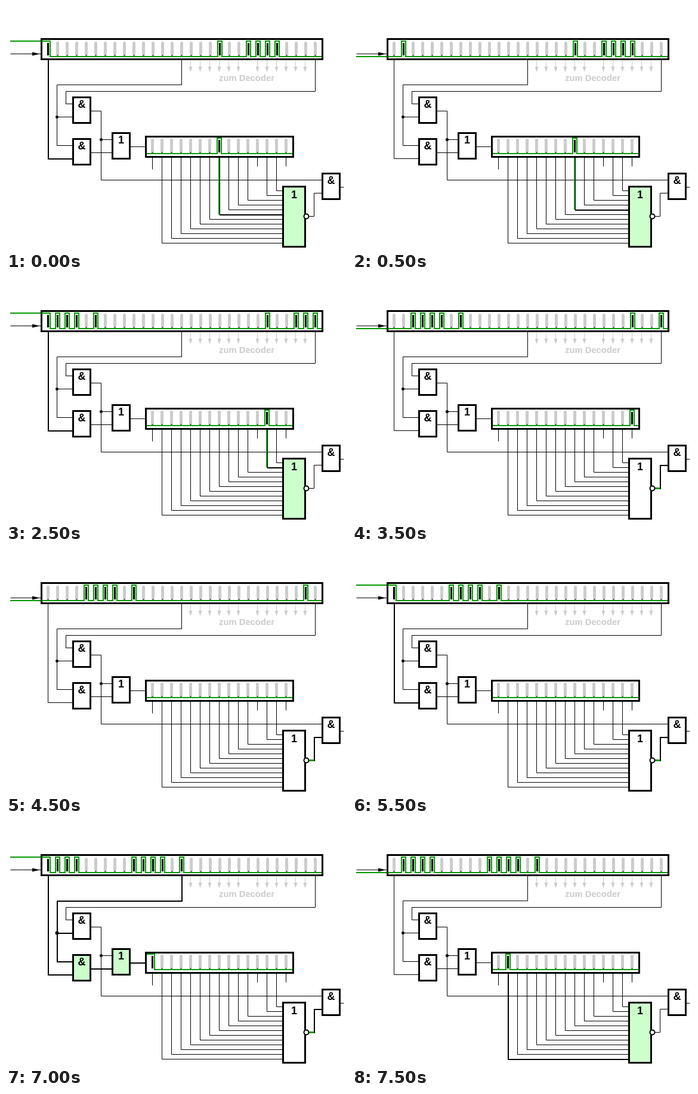
Write an HTML page with a canvas that moves like this. It is 570 px wide and 410 px high and loops after 8 s.

```html
<!DOCTYPE html>
<html lang="de">
<head>
<meta charset="utf-8">
<style>
html, body { margin: 0; width: 100%; height: 100%; overflow: hidden; background: #fff; }
canvas { display: block; }
</style>
</head>
<body>
<canvas id="stage" width="570" height="410"></canvas>
<script>
const ctx = document.getElementById('stage').getContext('2d');
const GREEN = '#009900', LIT = '#ccffcc', GRAY = '#cccccc';
const STEP = 500, STEPS = 16;

// Step at which each 1 enters the upper register
const entries = new Set([-24, -23, -22, -21, -18, 0, 2, 3, 4, 5, 11, 12, 13, 14]);
const inputLevels = '1010110000111110';

function line(points, width = 1, color = '#000') {
  const shift = width === 2 ? 1 : 0.5;
  ctx.strokeStyle = color;
  ctx.lineWidth = width;
  ctx.beginPath();
  for (const [x, y] of points) ctx.lineTo(x + shift, y + shift);
  ctx.stroke();
}

const wire = (on, ...points) => line(points, on ? 2 : 1);

function box(x, y, w, h, on) {
  ctx.fillStyle = on ? LIT : '#fff';
  ctx.fillRect(x, y, w, h);
  ctx.strokeStyle = '#000';
  ctx.lineWidth = 3;
  ctx.strokeRect(x + 1.5, y + 1.5, w - 3, h - 3);
}

function text(str, x, y, size, color, align) {
  ctx.font = `bold ${size}px "Liberation Sans", Arial, sans-serif`;
  ctx.fillStyle = color;
  ctx.textAlign = align;
  ctx.fillText(str, x, y);
}

function gate(label, x, y, on, w = 32, h = 46) {
  box(x, y, w, h, on);
  text(label, x + w / 2, y + (h > 46 ? 21 : 19), 18, '#000', 'center');
}

function disc(x, y, r) {
  ctx.fillStyle = '#000';
  ctx.beginPath();
  ctx.arc(x + 0.5, y + 0.5, r, 0, 7);
  ctx.fill();
}

function arrowHead(color, ...points) {
  ctx.fillStyle = color;
  ctx.beginPath();
  for (const [x, y] of points) ctx.lineTo(x, y);
  ctx.fill();
}

// top: y of the high level; joined: the first pulse runs in from the left
function register(left, width, boxTop, top, first, cells, joined) {
  box(left, boxTop, width, 37, false);
  const high = top + 1, low = top + 27;
  const path = [[left + 3, joined ? high : low]];
  cells.forEach((on, i) => {
    const x = first + 16 * i;
    if (on) {
      ctx.fillStyle = '#000';
      ctx.fillRect(x - 1, top + 4, 3, 21);
      if (i || !joined) path.push([x - 3, low], [x - 3, high]);
      path.push([x + 4, high], [x + 4, low]);
    } else {
      ctx.fillStyle = GRAY;
      ctx.beginPath();
      ctx.roundRect(x - 2, top + 2, 5, 23, 2);
      ctx.fill();
      ctx.fillStyle = '#777';
      ctx.fillRect(x - 1, top + 24, 3, 2);
    }
  });
  path.push([left + width - 3, low]);
  ctx.strokeStyle = GREEN;
  ctx.lineWidth = 2;
  ctx.beginPath();
  for (const [x, y] of path) ctx.lineTo(x, y);
  ctx.stroke();
}

function drawInput(high) {
  ctx.fillStyle = GREEN;
  ctx.fillRect(7, high ? 58 : 84, 51, 2);
  line([[7, 80], [58, 80]]);
  arrowHead('#000', [44, 77.5], [57, 80.5], [44, 83.5]);
}

function drawDecoderTaps() {
  for (let i = 15; i < 28; i++) {
    if (i === 21) continue;
    const x = 70 + 16 * i - 1;
    line([[x, 91], [x, 104]], 1, GRAY);
    arrowHead(GRAY, [x - 2.5, 102], [x + 3.5, 102], [x + 0.5, 111]);
  }
  text('zum Decoder', 357, 126, 14.8, GRAY, 'left');
}

// Wires from the lower register to the NOR gate; three cells are not connected
function drawNorInputs(active) {
  let y = 398;
  for (let i = 0; i < 15; i++) {
    const x = 245 + 16 * i, on = i === active;
    if (i === 0 || i === 11 || i === 14) {
      wire(false, [x, 254], [x, i ? 269 : 274]);
      continue;
    }
    if (on && i > 1) {
      line([[x, 254], [x, y]], 3, GREEN);
      line([[x + 1, 254], [x + 1, y]]);
      wire(true, [x, y], [464, y]);
    } else {
      wire(on, [x, 254], [x, y], [464, y]);
    }
    y -= 8;
  }
}

function draw(step) {
  ctx.fillStyle = '#fff';
  ctx.fillRect(0, 0, 570, 410);

  const high = inputLevels[step] === '1';
  const upper = Array.from({ length: 29 }, (_, i) => entries.has(step - i));
  if (step === 10) upper[0] = true;
  const active = step < 8 ? step + 7 : step - 14;
  const lower = Array.from({ length: 15 }, (_, i) => i === active);
  const match = upper[14] && upper[0];
  const anyInput = active >= 0 && ![0, 11, 14].includes(active);
  const lastTap = step === 4 || step === 10;

  drawInput(high);
  drawDecoderTaps();

  wire(upper[0], [70, 90], [70, 256], [112, 256]);
  wire(upper[14], [294, 90], [294, 132], [85, 132], [85, 234], [112, 234]);
  wire(upper[14], [85, 186], [112, 186]);
  wire(lastTap, [518, 90], [518, 143], [100, 143], [100, 164], [112, 164]);
  wire(false, [142, 176], [159, 176], [159, 292], [530, 292]);
  wire(false, [159, 224], [178, 224]);
  wire(match, [142, 246], [178, 246]);
  wire(match, [208, 236], [234, 236]);
  wire(false, [560, 304], [566, 304]);
  disc(85, 186, upper[14] ? 3 : 2.5);
  disc(159, 224, 2.5);
  drawNorInputs(active);

  wire(!anyInput, [507, 353], [516, 353], [516, 314], [530, 314]);
  if (!anyInput) line([[507, 353], [516, 353]], 3, GREEN);

  register(58, 474, 54, 58, 70, upper, high);
  register(233, 250, 218, 221, 245, lower, lower[0]);

  gate('&', 111, 152, false);
  gate('&', 111, 222, match);
  gate('1', 177, 212, match);
  gate('&', 529, 280, false);
  gate('1', 463, 302, anyInput, 40, 104);

  ctx.fillStyle = '#fff';
  ctx.strokeStyle = '#000';
  ctx.lineWidth = 2;
  ctx.beginPath();
  ctx.arc(503.5, 353.5, 4, 0, 7);
  ctx.fill();
  ctx.stroke();
}

const start = performance.now();
function tick() {
  draw(Math.floor((performance.now() - start) / STEP) % STEPS);
  requestAnimationFrame(tick);
}
tick();
</script>
</body>
</html>
```
